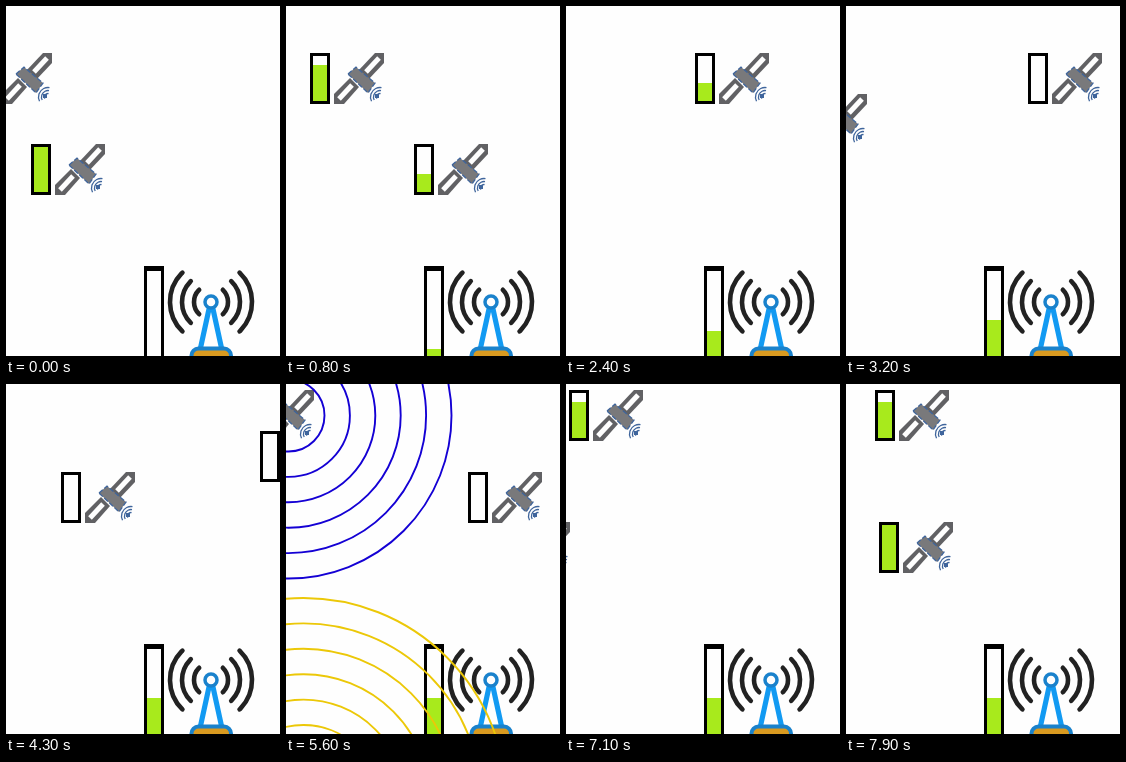
An HTML page with a canvas for the animation above (8000 ms loop, 274 px wide and 350 px high).

```html
<!DOCTYPE html>
<html lang="en">
<head>
<meta charset="utf-8">
<title>Satellite relay</title>
<style>
html, body { margin: 0; width: 100%; height: 100%; overflow: hidden; background: #fefefe; }
canvas { display: block; }
</style>
</head>
<body>
<canvas id="stage" width="274" height="350"></canvas>
<script>
const ctx = document.getElementById('stage').getContext('2d');
const LOOP = 8000, STEP = 100, FLASH = 200;
const GREEN = '#a8ea1c', BLUE = '#129af2', DEEP = '#1a82cc', GREY = '#616164', TRIM = '#3f659c';

// x at time t is x0 + v * (t - t0); charge lists [time, level] steps
const sats = [
  { y: 47, x0: -28.1, t0: 0, v: .0655, charge: [[0, .8], [2000, .4], [2900, 0]] },
  { y: 138, x0: 25, t0: 0, v: .1293, charge: [[0, 1], [500, .4], [1100, 0]] },
  { y: 88, x0: -52.9, t0: 3200, v: .0978, charge: [[0, 0]] },
  { y: 6, x0: -46.3, t0: 5600, v: .0327, charge: [[0, 1], [5500, .9], [6700, .8]] },
  { y: 138, x0: 33, t0: 7900, v: .1293, charge: [[0, 1]] }
];
const flashes = [[500, 1], [1100, 1], [2000, 0], [2900, 0], [5500, 3], [6700, 3]];
const groundLevel = [[0, 0], [500, 7], [1100, 14], [2000, 25], [2900, 36]];

const levelAt = (steps, t) => steps.filter(s => s[0] <= t).pop()[1];
const satX = (s, t) => Math.round(s.x0 + s.v * (t - s.t0));

function rect(x, y, w, h, color) {
  ctx.fillStyle = color;
  ctx.fillRect(x, y, w, h);
}

function poly(points, fill) {
  ctx.beginPath();
  for (let i = 0; i < points.length; i += 2) ctx.lineTo(points[i], points[i + 1]);
  ctx.closePath();
  ctx.fillStyle = fill;
  ctx.fill();
}

function line(x1, y1, x2, y2, color, width) {
  ctx.beginPath();
  ctx.moveTo(x1, y1);
  ctx.lineTo(x2, y2);
  ctx.strokeStyle = color;
  ctx.lineWidth = width;
  ctx.stroke();
}

function arc(x, y, r, color, width, from = 0, to = Math.PI * 2) {
  ctx.beginPath();
  ctx.arc(x, y, r, from, to);
  ctx.strokeStyle = color;
  ctx.lineWidth = width;
  ctx.stroke();
}

function battery(x, y, level) {
  rect(x, y, 20, 51, '#000');
  rect(x + 3, y + 3, 14, 45, '#fefefe');
  rect(x + 3, y + 48 - 45 * level, 14, 45 * level, GREEN);
}

function satellite(x, y) {
  ctx.save();
  ctx.translate(x, y);
  poly([41, 0, 50, 0, 50, 10, 34, 27, 24, 18], GREY);
  poly([0, 51, 0, 41, 16, 25, 25, 34, 10, 51], GREY);
  ctx.lineCap = 'butt';
  line(32, 19, 45, 5, '#fefefe', 5);
  line(5, 46, 18, 32, '#fefefe', 5);
  poly([14, 21, 22, 14, 41, 30, 34, 40], '#79797b');
  ctx.strokeStyle = TRIM;
  ctx.lineWidth = 1.3;
  ctx.setLineDash([5, 2]);
  ctx.stroke();
  ctx.setLineDash([]);
  for (const r of [3.5, 6.5, 9.5]) arc(46, 44, r, TRIM, 1.3, Math.PI * .85, Math.PI * 1.55);
  rect(41, 41, 4, 4, TRIM);
  ctx.restore();
}

function station(level) {
  rect(138, 260, 20, 90, '#000');
  rect(141, 265, 14, 85, '#fefefe');
  rect(141, 350 - level, 14, level, GREEN);
  ctx.lineCap = 'round';
  for (const r of [17, 29, 41]) {
    arc(205, 296, r, '#222', 4.6, -.8, .8);
    arc(205, 296, r, '#222', 4.6, Math.PI - .8, Math.PI + .8);
  }
  line(203, 303, 194.5, 342, BLUE, 5.2);
  line(207, 303, 215.5, 342, BLUE, 5.2);
  arc(205, 296, 6, DEEP, 3.5);
  ctx.beginPath();
  ctx.roundRect(185.5, 342.5, 39.5, 20, 7);
  ctx.fillStyle = '#d99a20';
  ctx.fill();
  ctx.strokeStyle = DEEP;
  ctx.lineWidth = 4;
  ctx.stroke();
}

function rings(x, y, first, color) {
  for (let i = 0; i < 6; i++) arc(x, y, first + 25.4 * i, color, 1.9);
}

function draw(t) {
  rect(0, 0, 274, 350, '#fefefe');
  station(levelAt(groundLevel, t));
  for (const s of sats) {
    const x = satX(s, t);
    if (x < -80 || x > 280) continue;
    battery(x, s.y, levelAt(s.charge, t));
    satellite(x + 24, s.y);
  }
  const flash = flashes.find(([at]) => t >= at && t < at + FLASH);
  if (flash) {
    const s = sats[flash[1]];
    rings(satX(s, t) + 48.5, s.y + 25.5, 36, '#1400d4');
    rings(17.5, 417, 76, '#ecc808');
  }
}

const start = performance.now();
function tick() {
  const t = (performance.now() - start) % LOOP;
  draw(Math.floor(t / STEP) * STEP);
  requestAnimationFrame(tick);
}
tick();
</script>
</body>
</html>
```
